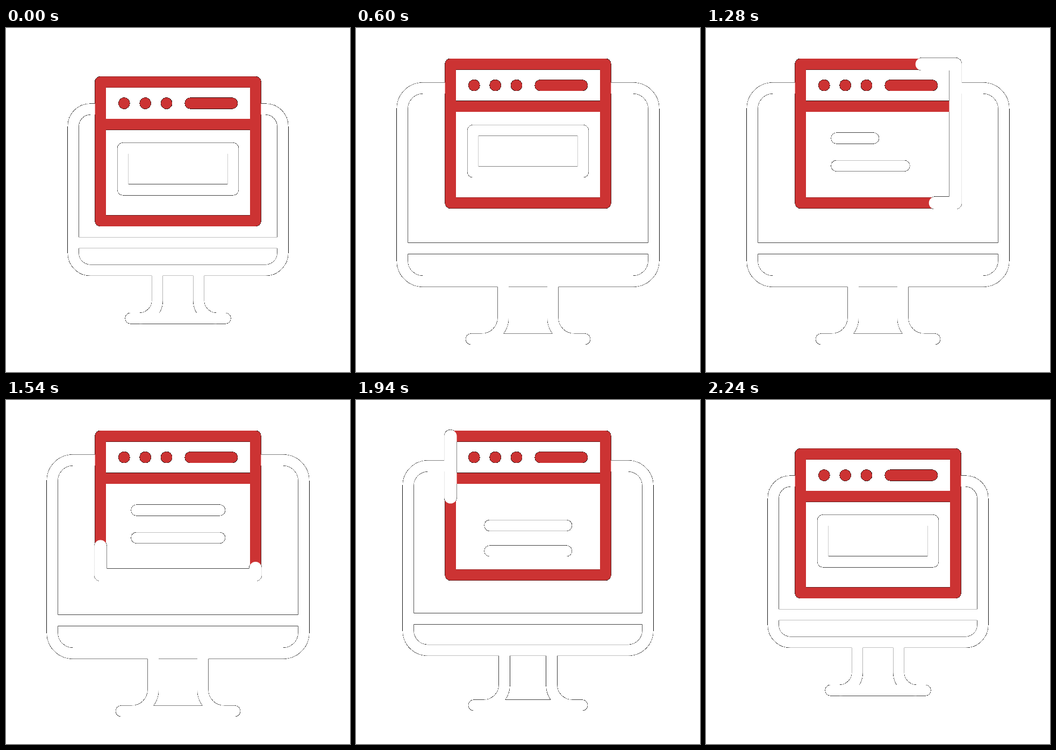
Recreate the animation shown at these times as an HTML page with a canvas. Size 640 by 640 pixels, loop 2.4 s.

```html
<!DOCTYPE html>
<html lang="en">
<head>
<meta charset="utf-8">
<title>Browser window on a monitor</title>
<style>
  html, body { margin: 0; width: 100%; height: 100%; overflow: hidden; background: #fff; }
  canvas { display: block; width: 640px; height: 640px; }
</style>
</head>
<body>
<canvas id="stage" width="640" height="640"></canvas>
<script>
const SIZE = 640, LOOP = 2400, STEP = 20;
const RED = '#cc3333', WHITE = '#fff', LINE = 20.4;
const ctx = document.getElementById('stage').getContext('2d', { willReadFrequently: true });

// Window geometry, measured along the middle of its border
const LEFT = 175.8, RIGHT = 464.2, TOP = 100.5, BAR = 78.7, HEIGHT = 258.2, RISE = 33.3;

// Eased progress from 0 to 1 between two times
function ease(t, from, to) {
  const x = Math.min(1, Math.max(0, (t - from) / (to - from)));
  return x * x * (3 - 2 * x);
}

// Builds a path scaled about (cx, cy) and moved by dy, then strokes it at constant weight
function stroke(build, { color = WHITE, width = LINE, scale = 1, cx = 0, cy = 0, dy = 0 } = {}) {
  ctx.save();
  ctx.translate(cx, cy + dy);
  ctx.scale(scale, scale);
  ctx.translate(-cx, -cy);
  ctx.beginPath();
  build();
  ctx.restore();
  ctx.strokeStyle = color;
  ctx.lineWidth = width;
  ctx.stroke();
}

function line(x1, y1, x2, y2) {
  ctx.moveTo(x1, y1);
  ctx.lineTo(x2, y2);
}

function leg(side) {
  const x = 320 + side * 38.5, foot = x + side * 33, floor = 540.1;
  ctx.moveTo(x, 450.6);
  ctx.lineTo(x, floor - 33);
  ctx.arcTo(x, floor, foot, floor, 33);
  ctx.lineTo(foot, floor);
}

function drawMonitor(scale) {
  const view = { scale, cx: 320, cy: 347 };
  ctx.lineCap = 'butt';
  stroke(() => ctx.roundRect(125.12, 150.9, 389.76, 299.7, 32), view);
  stroke(() => line(125.12, 399.5, 514.88, 399.5), view);
  stroke(() => leg(-1), view);
  stroke(() => leg(1), view);
  ctx.lineCap = 'round';
  stroke(() => line(232, 540.1, 408, 540.1), view);
}

function drawContent(t, top) {
  const cy = top + 162.5;
  // Sliding away from the middle also shrinks
  const slide = amount => ({ scale: 1 - 0.5 * Math.abs(amount), cx: 320, cy, dy: 170 * amount });
  const box = amount => stroke(() => ctx.rect(217.6, top + 123.2, 204.8, 77.3), slide(amount));

  ctx.save();
  ctx.beginPath();
  ctx.rect(LEFT, top + BAR, RIGHT - LEFT, HEIGHT - BAR);
  ctx.clip();

  if (t < 1000) box(ease(t, 600, 1000));
  if (t > 1800) box(ease(t, 1800, 2200) - 1);

  const away = slide(ease(t, 1840, 2240));
  const row = (y, grown) => {
    if (grown > 0) stroke(() => line(243, y, 243 + 154.5 * grown, y), away);
  };
  if (t < 2240) {
    row(top + 137.8, ease(t, 1095, 1495));
    row(top + 189.2, ease(t, 990, 1390));
  }
  ctx.restore();
}

function drawWindow(top) {
  const look = { color: RED };
  ctx.lineCap = 'butt';
  stroke(() => line(LEFT, top + BAR, RIGHT, top + BAR), look);
  stroke(() => ctx.rect(LEFT, top, RIGHT - LEFT, HEIGHT), look);
  ctx.lineCap = 'round';
  const y = top + 39.5;
  stroke(() => line(343, y, 420.6, y), look);
  ctx.fillStyle = RED;
  for (const x of [219.8, 259.2, 298.6]) {
    ctx.beginPath();
    ctx.arc(x, y, 10.4, 0, 7);
    ctx.fill();
  }
}

// White highlight running clockwise along the window border
function drawRunner(t, top) {
  const head = ease(t, 600, 1900), tail = ease(t, 900, 2200);
  if (head <= 0 || tail >= 1) return;
  const w = RIGHT - LEFT, total = 2 * (w + HEIGHT), bottom = top + HEIGHT;
  const corners = [0, w, w + HEIGHT, 2 * w + HEIGHT, total];
  const at = d =>
    d < corners[1] ? [LEFT + d, top] :
    d < corners[2] ? [RIGHT, top + d - corners[1]] :
    d < corners[3] ? [RIGHT - d + corners[2], bottom] :
    [LEFT, bottom - d + corners[3]];
  const from = tail * total, to = head * total;
  const stops = [from, ...corners.filter(c => c > from && c < to), to];
  stroke(() => {
    ctx.moveTo(...at(stops[0]));
    stops.slice(1).forEach(d => ctx.lineTo(...at(d)));
  }, { width: 23.4 });
}

// Partly covered pixels turn dark, empty ones white: this gives the hairline outlines
function darkenEdges() {
  const image = ctx.getImageData(0, 0, SIZE, SIZE), px = image.data;
  for (let i = 0; i < px.length; i += 4) {
    const a = px[i + 3];
    if (a === 255) continue;
    for (let c = i; c < i + 3; c++) px[c] = a < 6 ? 255 : px[c] * a / 255;
    px[i + 3] = 255;
  }
  ctx.putImageData(image, 0, 0);
}

function draw(t) {
  const zoom = ease(t, 195, 595) - ease(t, 1800, 2200);
  const lift = ease(t, 195, 595) - ease(t, 1993, 2220);
  const top = TOP - RISE * lift;

  ctx.clearRect(0, 0, SIZE, SIZE);
  ctx.lineJoin = 'round';
  drawMonitor(1 + 0.2 * zoom);
  ctx.clearRect(LEFT, top, RIGHT - LEFT, HEIGHT);
  drawContent(t, top);
  drawWindow(top);
  drawRunner(t, top);
  darkenEdges();
}

const start = performance.now();
let shown = -1;
function tick() {
  const t = Math.floor(((performance.now() - start) % LOOP) / STEP) * STEP;
  if (t !== shown) draw(shown = t);
  requestAnimationFrame(tick);
}
tick();
</script>
</body>
</html>
```
